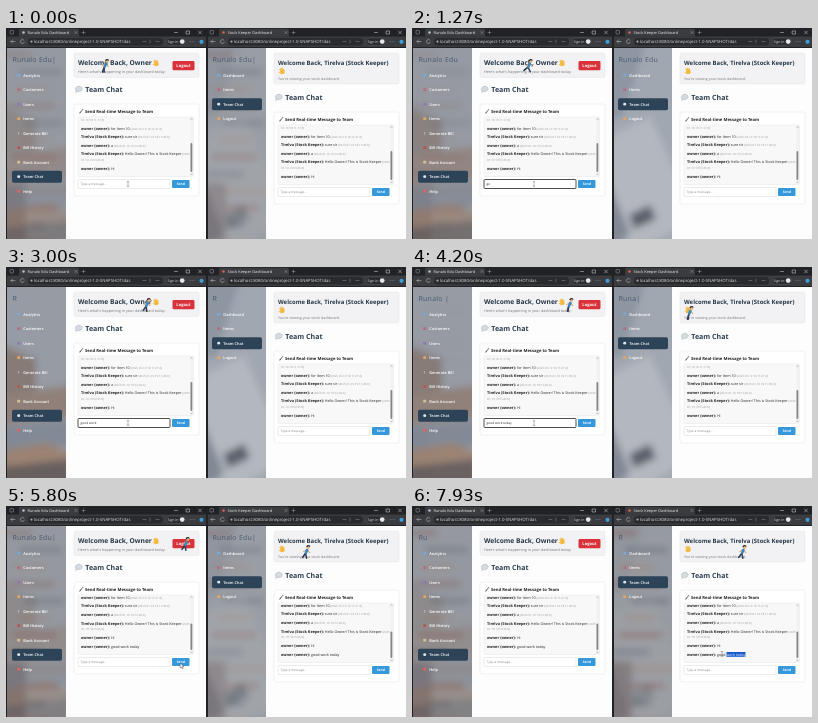
An HTML page for the animation above (8000 ms loop, 400 px wide and 211 px high).

```html
<!DOCTYPE html>
<html lang="en">
<head>
<meta charset="utf-8">
<title>Team chat</title>
<style>
  html, body { margin: 0; width: 100%; height: 100%; overflow: hidden; background: #202226; }
  svg { display: block; width: 100vw; height: 100vh; }
  text { font-family: "Open Sans", "Noto Sans", sans-serif; white-space: pre; text-rendering: geometricPrecision; }
  .bold { font-weight: 700; }
  .semi { font-weight: 600; }
  .stamp { font-size: 2.9px; fill: #999; }
</style>
</head>
<body>
<svg id="stage" viewBox="0 0 400 211" preserveAspectRatio="none"></svg>
<script>
const LOOP = 8000, SEND_AT = 5550, BLINK = 800;
const BRAND = 'Runalo Edu', MESSAGE = 'good work today';
const OWNER = 'owner (owner):', KEEPER = 'Tirelva (Stock Keeper):';

const rect = (x, y, w, h, fill, r = 0, more = '') =>
  `<rect x="${x}" y="${y}" width="${w}" height="${h}" rx="${r}" fill="${fill}" ${more}/>`;
const dot = (x, y, r, fill) => `<circle cx="${x}" cy="${y}" r="${r}" fill="${fill}"/>`;
const shape = (d, fill) => `<path d="${d}" fill="${fill}"/>`;
const line = (d, stroke, w = .6, more = '') =>
  `<path d="${d}" fill="none" stroke="${stroke}" stroke-width="${w}" stroke-linecap="round" ${more}/>`;
const text = (x, y, size, fill, content, more = '') =>
  `<text x="${x}" y="${y}" font-size="${size}" fill="${fill}" ${more}>${content}</text>`;
const clip = (id, x, y, w, h) => `<clipPath id="${id}">${rect(x, y, w, h, '#000')}</clipPath>`;
const outline = (color, w = .5) => `stroke="${color}" stroke-width="${w}"`;

// Linear interpolation through rows of [time, value, ...].
function at(points, t) {
  const i = points.findIndex(p => p[0] > t);
  if (i < 0) return points[points.length - 1].slice(1);
  if (i === 0) return points[0].slice(1);
  const a = points[i - 1], b = points[i], k = (t - a[0]) / (b[0] - a[0]);
  return a.slice(1).map((v, j) => v + (b[j + 1] - v) * k);
}

// Soft backdrops: printed pages, a stack of books, and a pale desk with a phone.
const print = rect(-5, 10, 75, 215, '#9fa0a4')
  + Array.from({ length: 12 }, (_, i) =>
    rect(i * 17 % 23 - 4, 24 + i * 17, 30 + i * 13 % 21, 6, ['#93706b', '#74777f', '#a58f84'][i % 3], 2)).join('')
  + rect(-4, 155, 24, 60, '#7b6d6d');
const books = rect(-5, 10, 75, 215, '#a2a6ae')
  + shape('M-5 78L30 92V130L-5 140Z', '#8f8079')
  + shape('M-5 128L66 118V150L-5 158Z', '#9c867b')
  + shape('M-5 160L66 152V178L-5 186Z', '#8b929e')
  + shape('M-5 184L40 176L66 186V196L-5 204Z', '#a98a74')
  + shape('M-5 200L66 192V225H-5Z', '#6c605d');
const desk = rect(-5, 10, 75, 215, '#aeb3bb')
  + shape('M-5 10H35L10 90H-5Z', '#989fab')
  + shape('M-5 110L38 88L66 150V200L22 225L-5 170Z', '#c2c5ca')
  + shape('M-5 150L18 205L-5 225Z', '#8a909b')
  + shape('M17 187L38 177L44 191L22 201Z', '#5f6570');

const sides = [
  {
    id: 'l', dx: 0, dy: 0, tab: BRAND + ' Dashboard', tabEnd: 72, active: 7, scene: books,
    nav: ['Analytics', 'Customers', 'Users', 'Items', 'Generate Bill', 'Bill History', 'Bank Account', 'Team Chat', 'Help'],
    brand: [[0, 10.5], [1300, 10.5], [2300, 0], [2800, .6], [4700, 10.5], [5950, 10.5], [6900, 0], [7500, .7], [8000, 2.9]],
    photo: [[0, .5], [1270, .7], [2500, 1], [5000, .9], [6300, .1], [8000, .4]],
    walker: t => 99 + t * .0139, walkerY: 38
  },
  {
    id: 'r', dx: 200, dy: 8, tab: 'Stock Keeper Dashboard', tabEnd: 82, active: 2, scene: desk,
    nav: ['Dashboard', 'Items', 'Team Chat', 'Logout'],
    brand: [[0, 10.5], [1600, 10.5], [2700, 1.2], [3550, 1.2], [5400, 10.5], [6600, 10], [7550, 1.2], [8000, 1.2]],
    photo: [[0, .4], [900, 1], [5000, 1], [6300, .05], [8000, .25]],
    walker: t => 77.5 + (t - 4200) * .0142, walkerY: 46
  }
];

function chrome(s) {
  const end = s.tabEnd;
  return rect(0, 0, 200, 20, '#202226')
    + rect(13, .8, end - 12, 8, '#3a3c40', 1.5)
    + rect(1, 8.5, 199, 10.5, '#3a3c40')
    + rect(4, 2.5, 3.5, 3.5, 'none', .7, outline('#aaa'))
    + dot(17.5, 4.5, 1.3, s.dx ? '#d9654e' : '#b9bec6')
    + text(21.5, 5.9, 3.9, '#eee', s.tab)
    + line(`M${end - 3} 3.5l2 2m0-2l-2 2M${end + 4} 4.5h3m-1.5-1.5v3`, '#bbb', .4)
    + line('M168.5 4.5h3M180.5 3h3v3h-3zM192.5 3l3 3m0-3l-3 3', '#ddd', .5)
    + line('M9 13.5H5m1.6-1.6L5 13.5l1.6 1.6M18 12.2a2 2 0 1 0 .3 2', '#ccc', .5)
    + rect(22, 10, 135, 7.5, '#292b2f', 3.5)
    + dot(25.5, 13.6, 1.1, '#aaa')
    + text(28, 15, 4.3, '#ddd', 'localhost:8080/onlineproject-1.0-SNAPSHOT/das')
    + line('M137 13.5h3m4-1.5v3m6-1.5h3', '#aaa', .4)
    + rect(160, 10, 19.5, 7.2, '#292b2f', 3.5, outline('#777', .3))
    + text(161.5, 14.8, 3.5, '#eee', 'Sign in')
    + dot(176.2, 13.6, 2.4, '#e4e8ec')
    + [184, 186, 188].map(x => dot(x, 13.6, .4, '#ccc')).join('')
    + dot(195.5, 13.8, 2.1, '#3e9fd8');
}

function sidebar(s) {
  const icons = ['#79a9d8', '#b66e7d', '#8e79b5', '#e2a55c', '#e8e8e8', '#b9564f', '#d4bf92', '#dfe7ef', '#e0625c'];
  const nav = s.nav.map((label, i) => {
    const y = 47.2 + i * 14.5, on = i === s.active;
    const icon = label === 'Generate Bill' ? text(11.5, y + 1.5, 3.85, '#fff', '?')
      : rect(11.2, y - 1.5, 3, 2.9, icons[on ? 7 : i], on ? 1.4 : .7);
    return (on ? rect(6, y - 6, 50, 12, '#2c4358', 1.8) : '') + icon
      + text(17.3, y + 1.5, 3.9, '#fff', label, 'class="semi"');
  }).join('');
  return `<g clip-path="url(#side)"><g filter="url(#blur)">${print}</g>
    <g id="${s.id}Photo" filter="url(#blur)">${s.scene}</g>${rect(1, 19, 59, 192, '#465466', 0, 'opacity=".12"')}</g>`
    + text(6.5, 34.4, 7, '#2c435d', '', `id="${s.id}Brand" letter-spacing=".25" opacity=".75"`) + nav;
}

const wave = (x, y) => `<g transform="translate(${x} ${y}) rotate(-18) scale(.9)">`
  + rect(-2.2, -.8, 4.7, 4.2, '#f5b83d', 1.6)
  + line('M-1.6 0v-2.6M-.3 0v-3.3M1 0v-3M2.2 .4v-2M-1.8 2l-1.7-1.5', '#f5b83d', 1.1) + '</g>';

const bubble = (x, y) => `<path d="M${x} ${y}a3.3 2.6 0 1 1 2 2.3l-1.7 1.2.2-1.8z" fill="#d6dbe1" stroke="#929baa" stroke-width=".4"/>`;

function header(s) {
  const right = s.dx > 0;
  return rect(68, 25, 125, right ? 31 : 24.5, '#f2f2f4', 2, outline('#dfdfe3', .4))
    + text(72, 37.3, right ? 5.95 : 6.65, '#273747',
      right ? 'Welcome Back, Tirelva (Stock Keeper)' : 'Welcome Back, Owner', 'class="bold"')
    + (right ? wave(76, 43) : wave(150, 35))
    + text(72, right ? 52 : 44.5, right ? 3.6 : 3.75, '#777',
      right ? "You're viewing your stock dashboard." : "Here's what's happening in your dashboard today.")
    + (right ? '' : rect(166.5, 33, 22, 9.3, '#d9323b', 1.4)
      + text(177.4, 39.2, 4.1, '#fff', 'Logout', 'class="bold" text-anchor="middle"'));
}

const walker = s => `<g clip-path="url(#head)"><g id="${s.id}Walker"><g transform="rotate(12) scale(.85)">`
  + line('M-.5 1.5L-1.5 7.5', '#27344a', 1.8, `id="${s.id}LegA"`)
  + line('M-.5 1.5L.5 7.5', '#34435c', 1.8, `id="${s.id}LegB"`)
  + line('M0-2.8L-3.2 .3M.4-2.8L4-.2', '#d9a066', 1.2)
  + line('M.6-2.7L-.1 1', '#3987c0', 3)
  + dot(1.3, -6, 1.9, '#e5b27b') + line('M-.5-6.2a1.9 1.9 0 0 1 3-1.5', '#30292b', 1.4) + '</g></g></g>';

function chat(s) {
  const row = (y, name, body, stamp) => text(75, y, 3.65, '#222',
    `<tspan class="bold" font-size="3.85">${name}</tspan> ${body}<tspan class="stamp"> ${stamp}</tspan>`);
  const list = text(75, 92.8, 2.9, '#999', '01-18 19:11:17.0]')
    + row(101.5, OWNER, 'for Item 10', '[2025-01-19 19:11:21.0]')
    + row(110.1, KEEPER, 'sure sir', '[2025-01-19 19:11:38.0]')
    + row(118.7, OWNER, 'a', '[2025-01-19 19:12:28.0]')
    + row(127.3, KEEPER, 'Hello Owner! This is Stock Keeper', '[2025-')
    + text(75, 132.7, 2.9, '#999', '01-19 13:53:45.0]')
    + row(141.6, OWNER, 'Hi', '')
    + `<g id="${s.id}New">${rect(0, 146.6, 0, 4.8, '#1759c9', 0, `id="${s.id}Mark"`)}
       <text id="${s.id}Sent" x="75" y="150.2" font-size="3.65" fill="#222"><tspan class="bold" font-size="3.85">${OWNER}</tspan> <tspan id="${s.id}Plain"></tspan><tspan id="${s.id}Picked" fill="#fff"></tspan></text></g>`;
  return `<g transform="translate(0 ${s.dy})">`
    + bubble(69.5, 61) + text(79.3, 63.8, 7.05, '#2c3e50', 'Team Chat', 'class="bold"')
    + rect(68, 76, 125, 92, '#fff', 2, outline('#e2e3e7', .5))
    + line('M74 85l2.8-3.6M74 85l.3-1', '#596572', .9)
    + text(79, 84.8, 4.2, '#222', 'Send Real-time Message to Team', 'class="bold"')
    + rect(72, 89, 115.5, 59.5, '#f8f8f9', 1, outline('#dedee2', .4))
    + `<g clip-path="url(#list)"><g id="${s.id}List">${list}</g></g>`
    + rect(184, 89.3, 3.3, 58.9, '#f3f3f3')
    + rect(184.5, 115, 1.8, 29, '#858585', .9, `id="${s.id}Thumb"`)
    + line('M184.7 91.5l.8-1 .8 1M184.7 146l.8 1 .8-1', '#777', .4)
    + rect(72, 151.5, 92, 9, '#fff', 1, outline('#ccc', .4) + ` id="${s.id}Input"`)
    + `<text id="${s.id}Draft" x="74.6" y="157.2" font-size="3.2"></text>`
    + rect(166, 152, 17.5, 8, '#3498db', 1)
    + text(174.8, 157.2, 3.4, '#fff', 'Send', 'class="bold" text-anchor="middle"')
    + '</g>';
}

const page = s => `<g transform="translate(${s.dx} 0)">`
  + rect(60, 19, 140, 192, '#fdfdfe')
  + sidebar(s) + header(s) + chat(s) + walker(s) + chrome(s)
  + rect(0, 0, s.dx ? 2 : 1, 211, '#202226') + '</g>';

document.getElementById('stage').innerHTML = '<defs>'
  + '<filter id="blur" x="-20%" y="-20%" width="140%" height="140%"><feGaussianBlur stdDeviation="3.5"/></filter>'
  + clip('side', 1, 19, 59, 192) + clip('head', 68, 25, 125, 31) + clip('list', 72.3, 89.3, 112, 58.9) + '</defs>'
  + sides.map(page).join('')
  + line('M-.8-2.3h1.6M0-2.3v4.6M-.8 2.3h1.6', '#555', .4, 'id="beam"')
  + '<path id="arrow" d="M0 0v5l1.2-1.1.9 2 .9-.5-.9-1.8 1.6-.1z" fill="#fff" stroke="#222" stroke-width=".4"/>';

const $ = id => document.getElementById(id);
const set = (id, attrs) => Object.entries(attrs).forEach(([k, v]) => $(id).setAttribute(k, v));

const typing = [[0, 0], [850, 0], [1270, 2.2], [3000, 9.3], [4100, 15], [8000, 15]];
const pointer = [[0, 122, 156], [4300, 122, 156], [5000, 158, 161], [5350, 174, 157], [5800, 174, 157],
  [6700, 333, 148], [7350, 333, 148], [7850, 310, 148], [8000, 310, 148]];
const selecting = [[0, 0], [7350, 0], [7850, 10], [8000, 10]];

function renderSide(s, t) {
  const id = s.id, sent = t >= SEND_AT, left = !s.dx;
  const letters = Math.floor(at(s.brand, t)[0]);
  const caret = t % BLINK < BLINK / 2 ? '|' : '';
  $(id + 'Brand').textContent = BRAND.slice(0, letters) + caret;
  set(id + 'Photo', { opacity: at(s.photo, t)[0] });

  const swing = Math.sin(t / 170) * 32;
  set(id + 'Walker', { transform: `translate(${s.walker(t)} ${s.walkerY})` });
  set(id + 'LegA', { transform: `rotate(${swing} -.5 1.5)` });
  set(id + 'LegB', { transform: `rotate(${-swing} -.5 1.5)` });

  set(id + 'List', { transform: `translate(0 ${sent ? -8.6 : 0})` });
  set(id + 'New', { visibility: sent ? 'visible' : 'hidden' });
  set(id + 'Thumb', sent ? { y: 117.5, height: 26.5 } : { y: 115, height: 29 });

  const picked = left ? 0 : Math.floor(at(selecting, t)[0]);
  const cut = MESSAGE.length - picked;
  $(id + 'Plain').textContent = MESSAGE.slice(0, cut);
  $(id + 'Picked').textContent = MESSAGE.slice(cut);
  if (picked) {
    const label = $(id + 'Sent'), from = label.getStartPositionOfChar(OWNER.length + 1 + cut).x;
    set(id + 'Mark', { x: from, width: 75 + label.getComputedTextLength() - from });
  } else set(id + 'Mark', { width: 0 });

  const focused = left && t > 700 && !sent;
  const draft = focused ? MESSAGE.slice(0, Math.floor(at(typing, t)[0])) : '';
  $(id + 'Draft').textContent = draft || 'Type a message...';
  set(id + 'Draft', { fill: draft ? '#222' : '#888' });
  set(id + 'Input', { stroke: focused ? '#222' : '#ccc', 'stroke-width': focused ? .8 : .4 });
}

function render(t) {
  sides.forEach(s => renderSide(s, t));
  const place = `translate(${at(pointer, t).join(' ')})`;
  const overText = t < 4350 || t > 6500;
  set('beam', { transform: place, visibility: overText ? 'visible' : 'hidden' });
  set('arrow', { transform: place, visibility: overText ? 'hidden' : 'visible' });
}

const start = performance.now();
function tick() {
  render((performance.now() - start) % LOOP);
  requestAnimationFrame(tick);
}
tick();
</script>
</body>
</html>
```
